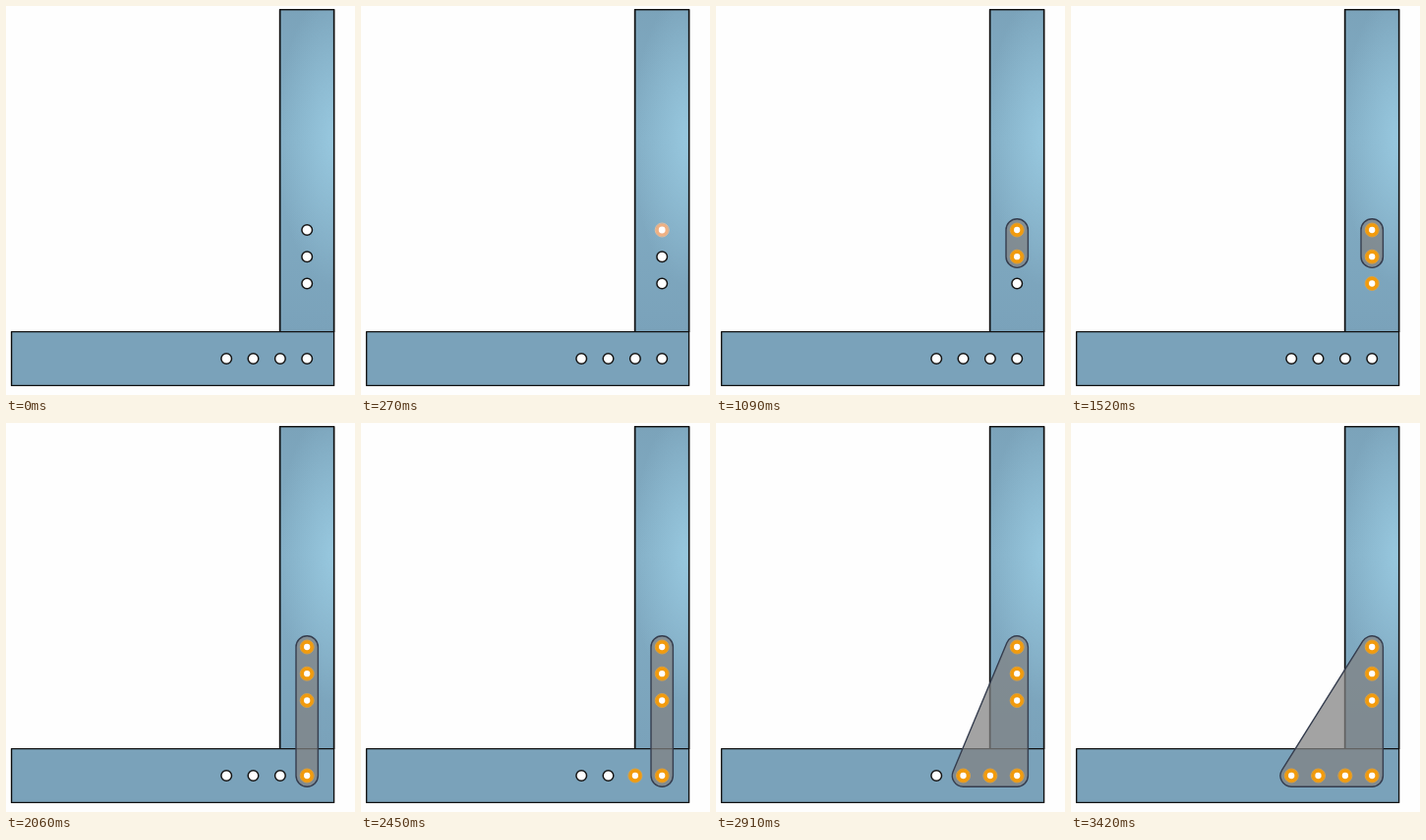
Animation, 355 px wide and 396 px high, one loop 4120 ms. Source, as an HTML page:

```html
<!DOCTYPE html>
<html lang="en">
<head>
<meta charset="utf-8">
<title>Bracket sketch</title>
<style>
html, body { margin: 0; width: 100%; height: 100%; overflow: hidden; background: #fefefe; }
svg { display: block; width: 355px; height: 396px; }
</style>
</head>
<body>
<svg id="stage" viewBox="0 0 355 396" xmlns="http://www.w3.org/2000/svg">
  <defs>
    <linearGradient id="steel" x1="0" y1="0" x2="0" y2="1">
      <stop offset="0" stop-color="#7ba3ba"/>
      <stop offset=".4" stop-color="#83aec5"/>
      <stop offset="1" stop-color="#7aa2ba"/>
    </linearGradient>
    <radialGradient id="shine" gradientUnits="userSpaceOnUse" cx="0" cy="0" r="1"
      gradientTransform="translate(334 135) scale(58 150)">
      <stop offset="0" stop-color="#9acbe2" stop-opacity=".9"/>
      <stop offset="1" stop-color="#9acbe2" stop-opacity="0"/>
    </radialGradient>
  </defs>
  <rect width="355" height="396" fill="#fefefe"/>
  <g stroke="#111" stroke-width="1.4" stroke-linejoin="round">
    <rect x="278.6" y="3.6" width="55" height="328" fill="url(#steel)"/>
    <rect x="278.6" y="3.6" width="55" height="328" fill="url(#shine)"/>
    <rect x="5.6" y="331.6" width="328" height="54.8" fill="#7aa2ba"/>
  </g>
  <path id="plate" fill="#828282" fill-opacity=".72" stroke="#353d4e" stroke-width="1.4"/>
  <g id="holes"></g>
</svg>
<script>
const LOOP = 4120;
const PLATE_R = 11.2;

// Each hole: position, then the times it is hovered, picked and joined to the plate.
const holes = [
  { x: 306.2, y: 228, hover: 210, pick: 480, join: 1030 },
  { x: 306.2, y: 255.2, hover: 670, pick: 940, join: 1030 },
  { x: 306.2, y: 282.5, hover: 1150, pick: 1520, join: 1610 },
  { x: 306.2, y: 359, hover: 1730, pick: 1970, join: 2060 },
  { x: 278.9, y: 359, hover: 2200, pick: 2420, join: 2520 },
  { x: 251.5, y: 359, hover: 2640, pick: 2820, join: 2910 },
  { x: 224.2, y: 359, hover: 2970, pick: 3060, join: 3150 }
];

const looks = {
  plain: { r: 5.3, stroke: '#151515', width: 1.5, halo: 'none' },
  hover: { r: 5, stroke: '#eeb083', width: 3.2, halo: '#f0c09a' },
  picked: { r: 4.9, stroke: '#f29b0c', width: 3.5, halo: '#e6a43c' }
};

const plate = document.getElementById('plate');
const group = document.getElementById('holes');

function circle(x, y) {
  const el = document.createElementNS('http://www.w3.org/2000/svg', 'circle');
  el.setAttribute('cx', x);
  el.setAttribute('cy', y);
  group.appendChild(el);
  return el;
}

function set(el, attrs) {
  for (const key in attrs) el.setAttribute(key, attrs[key]);
}

for (const h of holes) {
  h.halo = circle(h.x, h.y);
  h.ring = circle(h.x, h.y);
  set(h.halo, { r: 7, fill: 'none', 'stroke-width': 0.9 });
  h.ring.setAttribute('fill', '#fff');
}

// Corner holes of the plate, clockwise on screen.
function corners(joined) {
  if (joined.length < 2) return [];
  const column = joined.slice(0, 4);
  const list = [column[0], column[column.length - 1]];
  if (joined.length > 4) list.push(joined[joined.length - 1]);
  return list;
}

// Outline at a fixed distance around the corners, with round ends.
function outline(points, r) {
  let d = '';
  points.forEach((a, i) => {
    const b = points[(i + 1) % points.length];
    const len = Math.hypot(b.x - a.x, b.y - a.y);
    const nx = (b.y - a.y) / len * r;
    const ny = (a.x - b.x) / len * r;
    const start = `${a.x + nx} ${a.y + ny}`;
    d += i ? `A${r} ${r} 0 0 1 ${start}` : `M${start}`;
    d += `L${b.x + nx} ${b.y + ny}`;
    if (i === points.length - 1) {
      const [, first] = d.match(/^M([^L]+)L/);
      d += `A${r} ${r} 0 0 1 ${first}Z`;
    }
  });
  return d;
}

function draw(t) {
  plate.setAttribute('d', outline(corners(holes.filter(h => t >= h.join)), PLATE_R));
  for (const h of holes) {
    const look = looks[t >= h.pick ? 'picked' : t >= h.hover ? 'hover' : 'plain'];
    set(h.ring, { r: look.r, stroke: look.stroke, 'stroke-width': look.width });
    h.halo.setAttribute('stroke', look.halo);
  }
}

const begin = performance.now();
function tick() {
  draw((performance.now() - begin) % LOOP);
  requestAnimationFrame(tick);
}
draw(0);
requestAnimationFrame(tick);
</script>
</body>
</html>
```
